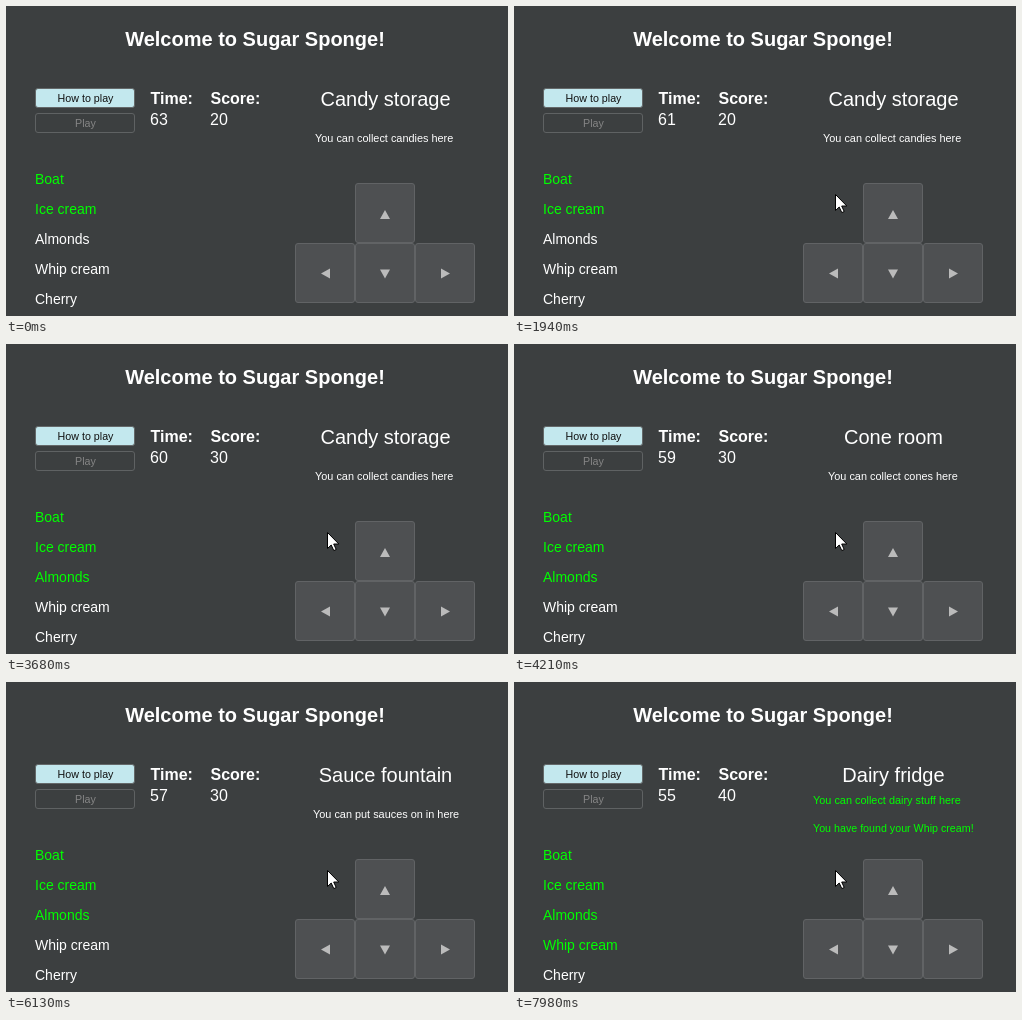
Recreate the animation shown at these times as an HTML page. Size 502x310 px, loop 8 s.

```html
<!DOCTYPE html>
<html lang="en">
<head>
<meta charset="utf-8">
<title>Dessert game</title>
<style>
  html, body { margin: 0; width: 100%; height: 100%; overflow: hidden; background: #3c3f40; }
  svg { display: block; width: 502px; height: 310px; font: 16px "Liberation Sans", Arial, sans-serif; fill: #fff; }
  .title { font-size: 20px; font-weight: bold; }
  .room { font-size: 20px; }
  .middle { text-anchor: middle; }
  .bold { font-weight: bold; }
  .item { font-size: 14px; }
  .hint { font-size: 10.9px; }
  .small { font-size: 10.7px; }
  .found { fill: #0f0; }
  .pad rect { fill: #4e5052; stroke: #616365; }
  .pad rect.hover { fill: #56585a; }
  .pad path { fill: #bbb; }
</style>
</head>
<body>
<svg viewBox="0 0 502 310">
  <text class="title middle" x="249" y="40">Welcome to Sugar Sponge!</text>

  <rect x="29.5" y="82.5" width="99" height="19" rx="2.5" fill="#c3e8ee" stroke="#646869"/>
  <text class="small middle" x="79.5" y="96" fill="#111">How to play</text>
  <rect x="29.5" y="107.5" width="99" height="19" rx="2.5" fill="none" stroke="#5f6263"/>
  <text class="small middle" x="79.5" y="121" fill="#858585">Play</text>

  <text class="bold" x="144.5" y="98">Time:</text>
  <text class="bold" x="204.5" y="98">Score:</text>
  <text id="time" x="144" y="119"></text>
  <text id="score" x="204" y="119"></text>

  <g id="items"></g>

  <text id="room" class="room middle" x="379.5" y="100"></text>
  <text id="hint" class="hint"></text>
  <text id="reward" class="small found" y="150"></text>

  <g class="pad">
    <rect x="349.5" y="177.5" width="59" height="59" rx="2.5"/>
    <rect x="289.5" y="237.5" width="59" height="59" rx="2.5"/>
    <rect x="349.5" y="237.5" width="59" height="59" rx="2.5"/>
    <rect id="right" x="409.5" y="237.5" width="59" height="59" rx="2.5"/>
    <path d="M379 204l5 9h-10zM315 267.5l9-5v10zM379 272.5l-5-9h10zM444 267.5l-9-5v10z"/>
  </g>

  <g id="pointer">
    <circle id="click" r="12" fill="#9b991d"/>
    <path d="M.5 .5V16.5L4.2 13L6.8 18.6L9.2 17.5L6.7 12H11.8Z" stroke="#000"/>
  </g>
</svg>
<script>
const LOOP = 8000;
const $ = id => document.getElementById(id);

const items = ["Boat", "Ice cream", "Almonds", "Whip cream", "Cherry"].map((name, i) => {
  const label = document.createElementNS("http://www.w3.org/2000/svg", "text");
  label.textContent = name;
  label.setAttribute("x", 29);
  label.setAttribute("y", 178 + 30 * i);
  $("items").append(label);
  return label;
});

const candy = { name: "Candy storage", hint: "You can collect candies here", x: 309 };
const visits = [
  { at: 0, ...candy },
  { at: 2470, name: "Nuts cupboard", hint: "You can collect almonds here", x: 307, reward: "Almonds" },
  { at: 3680, ...candy },
  { at: 4210, name: "Cone room", hint: "You can collect cones here", x: 314 },
  { at: 5600, name: "Topping counter", hint: "You can put toppings on in here", x: 304 },
  { at: 6130, name: "Sauce fountain", hint: "You can put sauces on in here", x: 307 },
  { at: 7060, name: "Dairy fridge", hint: "You can collect dairy stuff here", x: 299, reward: "Whip cream" }
];
const ticks = [930, 1940, 2930, 3940, 4940, 5930, 6920, 7980];
const moves = [130, 200, 260, 330];

const passed = (times, t) => times.filter(at => t >= at).length;

function drawRoom(t) {
  const seen = visits.filter(visit => t >= visit.at);
  const visit = seen[seen.length - 1];
  const foundCount = 2 + seen.filter(v => v.reward).length;

  $("room").textContent = visit.name;
  $("hint").textContent = visit.hint;
  $("hint").setAttribute("x", visit.x);
  $("hint").setAttribute("y", visit.reward ? 122 : 136);
  $("hint").classList.toggle("found", !!visit.reward);
  $("reward").textContent = visit.reward ? `You have found your ${visit.reward}!` : "";
  $("reward").setAttribute("x", visit.x);
  $("score").textContent = foundCount * 10;
  items.forEach((label, i) => label.setAttribute("class", i < foundCount ? "item found" : "item"));
}

function drawPointer(t) {
  const step = passed(moves, t);
  const left = (moves.length - step) / (moves.length - 1);
  $("pointer").style.display = step ? "" : "none";
  $("pointer").setAttribute("transform", `translate(${Math.round(321 + 119 * left)} ${Math.round(188 + 80 * left)})`);
  $("click").style.display = t >= 590 && t < 730 ? "" : "none";
  $("right").classList.toggle("hover", step === 1);
}

function draw(now) {
  const t = now % LOOP;
  $("time").textContent = 63 - passed(ticks, t);
  drawRoom(t);
  drawPointer(t);
}

let start;
function frame(now) {
  start ??= now;
  draw(now - start);
  requestAnimationFrame(frame);
}
draw(0);
requestAnimationFrame(frame);
</script>
</body>
</html>
```
